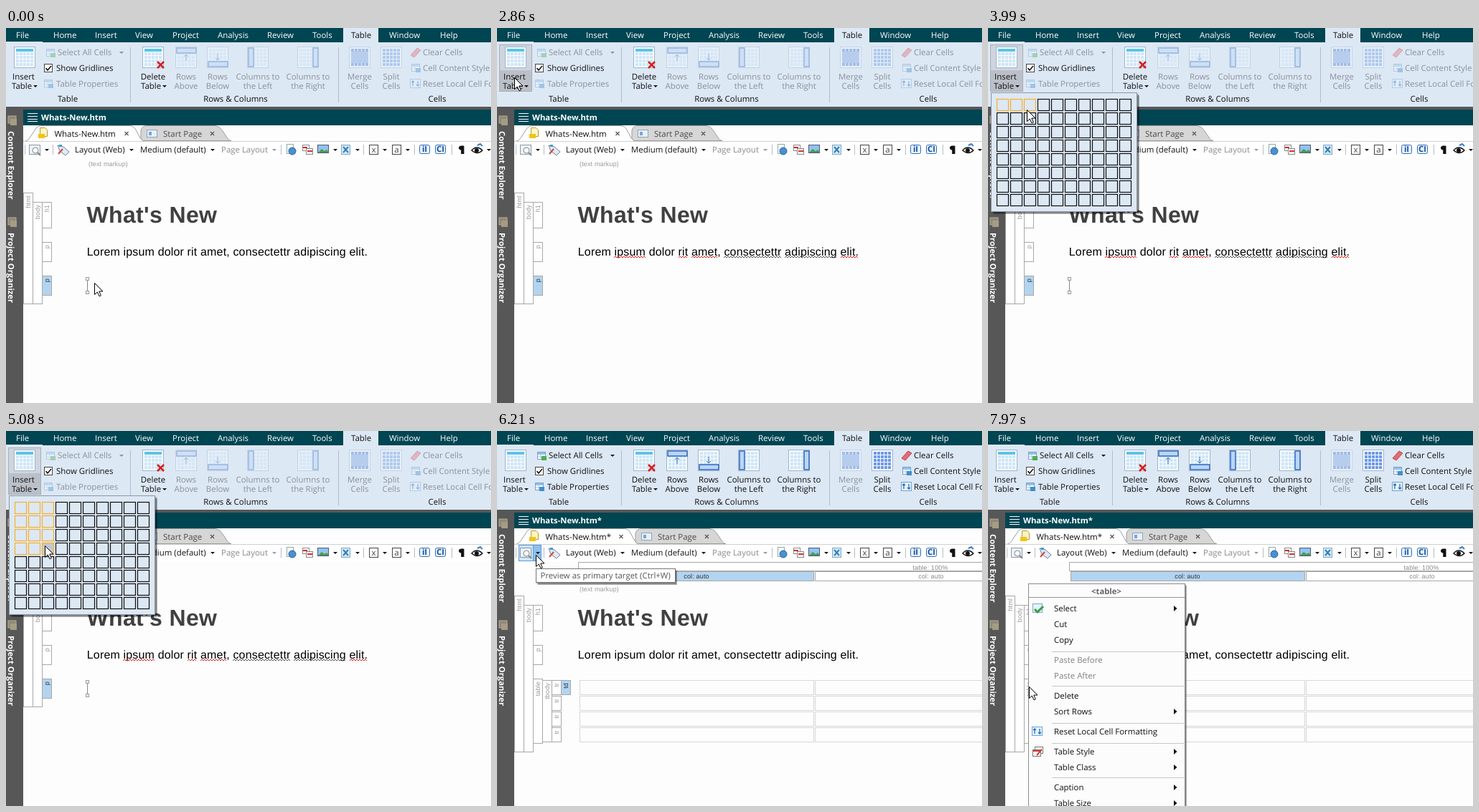
Animation of 676x524 px, one loop 8000 ms. Source, as an HTML page:

```html
<!DOCTYPE html>
<html lang="en">
<head>
<meta charset="utf-8">
<title>Insert a table</title>
<style>
  html, body { margin: 0; width: 100%; height: 100%; overflow: hidden; background: #fdfdfd; }
  svg { display: block; }
  text { font: 11.45px "Open Sans", sans-serif; text-rendering: geometricPrecision; white-space: pre; }
  .b { font-weight: 700; font-size: 11.3px; }
  .s { font: 9px "Liberation Sans", sans-serif; letter-spacing: .15px; }
  .h { font: 700 32px "Liberation Sans", sans-serif; letter-spacing: .35px; }
  .p { font: 16px "Liberation Sans", sans-serif; letter-spacing: .16px; }
  .m { text-anchor: middle; }
  .e { text-anchor: end; }
  .off { opacity: .4; }
</style>
</head>
<body>
<svg id="stage" width="676" height="524" viewBox="0 0 676 524"></svg>
<script>
const TEAL = '#004552', PANEL = '#dde8f5', DARK = '#575757', BLUE = '#b3d4f0', EDGE = '#a8a8a8', INK = '#111';

const text = (x, y, s, fill = INK, cls = '', extra = '') =>
  `<text x="${x}" y="${y}" fill="${fill}" class="${cls}" ${extra}>${s.replace(/&/g, '&amp;').replace(/</g, '&lt;')}</text>`;
const rect = (x, y, w, h, fill = 'none', stroke = 'none', extra = '') =>
  `<rect x="${x}" y="${y}" width="${w}" height="${h}" fill="${fill}" stroke="${stroke}" ${extra}/>`;
const path = (d, fill = 'none', stroke = 'none', width = 1, extra = '') =>
  `<path d="${d}" fill="${fill}" stroke="${stroke}" stroke-width="${width}" ${extra}/>`;
const group = (id, body, extra = '') => `<g id="${id}" ${extra}>${body}</g>`;
const dim = body => `<g class="off">${body}</g>`;
const down = (x, y, fill = INK) => path(`M${x - 3} ${y - 1}h6l-3 3z`, fill);
const vline = (x, y, h, color = '#b4bcc8') => path(`M${x + .5} ${y}v${h}`, 'none', color);
const cross = (x, y, r, color, width) => path(`M${x - r} ${y - r}l${2 * r} ${2 * r}m0 ${-2 * r}l${-2 * r} ${2 * r}`, 'none', color, width);
const repeat = (n, f) => Array.from({ length: n }, (_, i) => f(i)).join('');

// Ribbon
function tableIcon(cx, cell = '#cfe6f8', extra = '') {
  return rect(cx - 14.5, 26.5, 29, 29, '#f8fcff', '#9db4cc') +
    repeat(25, i => rect(cx - 12 + i % 5 * 5, 29 + (i / 5 | 0) * 5, 4, 4, cell)) + extra;
}
const headRow = cx => rect(cx - 12, 29, 24, 4, '#5cc4e6');
const band = (x, y, w, h) => rect(x, y, w, h, '#b9d6f6', '#3a6fc0', 'stroke-width="1.6"');
const bigButton = (cx, icon, a, b) => icon + text(cx, 72, a, INK, 'm') + text(cx, 85, b, INK, 'm');
const smallTable = (x, y, mark = '#3f8fd0') =>
  rect(x + .5, y + .5, 11, 10, '#fff', '#7f9fc4') + rect(x + 1, y + 1, 10, 3, '#8cc4ea') +
  path(`M${x + 1} ${y + 7}h10m-6-3v6`, 'none', '#a9c3de') + rect(x + 6, y + 6, 7, 6, mark);
const refresh = (x, y) => rect(x + .5, y + .5, 14, 12, '#e8f3fc', '#6fa3d6') +
  path(`M${x + 4} ${y + 10}v-7l-2 2m2-2l2 2m5-2v7l-2-2m2 2l2-2`, 'none', '#1f6fc0', 1.3);

const tabs = [['File', 14], ['Home', 66], ['Insert', 124], ['View', 180], ['Project', 232], ['Analysis', 295],
  ['Review', 364], ['Tools', 427], ['Window', 534], ['Help', 605]];

const ribbon =
  rect(0, 0, 676, 20, TEAL) + rect(0, 19, 676, 91, PANEL) + rect(51, 19, 419, 1, TEAL) + rect(519, 19, 157, 1, TEAL) +
  rect(470, 0, 49, 20, PANEL) + tabs.map(([s, x]) => text(x, 14, s, '#fff')).join('') + text(481, 14, 'Table') +
  group('press', rect(4, 24, 44, 35, '#cfd5de') + rect(4, 59, 44, 29, '#bbc0c8') + rect(3.5, 23.5, 45, 65, 'none', '#a7adb6')) +
  tableIcon(26, undefined, headRow(26)) + text(24.5, 72, 'Insert', INK, 'm') + text(8, 85, 'Table') + down(41, 81) +
  rect(53.5, 50.5, 11, 11, '#fff', '#444') + path('M55.500 56l2.500 3l5-6', 'none', INK, 1.5) + text(70, 60, 'Show Gridlines') +
  text(86, 103, 'Table', INK, 'm') + vline(173, 27, 77) +
  tableIcon(205, undefined, headRow(205) + cross(215.5, 51.5, 4.5, '#d3201f', 2.6)) +
  text(205, 72, 'Delete', INK, 'm') + text(188, 85, 'Table') + down(221, 81) +
  text(320, 103, 'Rows & Columns', INK, 'm') + vline(463, 27, 77) + text(601, 103, 'Cells', INK, 'm') +
  dim(bigButton(493, tableIcon(493, '#4f7fd0', rect(481, 33, 24, 16, '#7fa6e4')), 'Merge', 'Cells')) +
  group('editing',
    smallTable(56, 29, '#4caf50') + text(72, 38, 'Select All Cells') + down(161, 34) +
    smallTable(53, 72) + text(70, 82, 'Table Properties') +
    bigButton(251, tableIcon(251, undefined, band(238, 28, 27, 7) + path('M251 46v-9m-3 3l3-3l3 3', 'none', '#3a6fc0')), 'Rows', 'Above') +
    bigButton(295, tableIcon(295, undefined, band(282, 47, 27, 7) + path('M295 36v9m-3-3l3 3l3-3', 'none', '#3a6fc0')), 'Rows', 'Below') +
    bigButton(351, tableIcon(351, undefined, band(338, 28, 7, 26)), 'Columns to', 'the Left') +
    bigButton(421, tableIcon(421, undefined, band(428, 28, 7, 26)), 'Columns to', 'the Right') +
    bigButton(537, tableIcon(537, '#6f9be4'), 'Split', 'Cells') +
    path('M564 38l9-10l5 3l-9 10z', '#e56a72', '#b8454f') + text(581, 38, 'Clear Cells') +
    smallTable(565, 50) + text(581, 60, 'Cell Content Style') +
    refresh(563, 71) + text(581, 82, 'Reset Local Cell Formatting'));

// Frame around the document
const sideTab = (y, s) => text(0, 0, s, '#fff', 'b', `transform="translate(2.500 ${y + 15}) rotate(90)"`) +
  rect(3, y - 6, 11, 10, '#8f8877', '#b5ad98') + rect(6, y - 2, 9, 9, '#a59c84');
const frame =
  rect(0, 110, 676, 4, DARK) + rect(0, 110, 24, 414, DARK) + sideTab(129, 'Content Explorer') + sideTab(271, 'Project Organizer') +
  rect(24, 114, 652, 22, TEAL) + path('M30 119.500h14m-14 4h14m-14 4h14m-14 3h14', 'none', '#fff');

function titles(dx, star) {
  const end = 172 + dx;
  return text(49, 129, 'Whats-New.htm' + star, '#fff', 'b') +
    path(`M${end + 16} 157.500V143q2-6.500 8-6.500H${end + 119}q6 0 10 6l8 12q2 3 5 3z`, '#d6d6d6', '#9c9c9c') +
    path(`M24 158.500q6 0 9-5l8-12q3-5 9-5H${end}q6 0 9 6l6 11q3 5 7 5`, '#fff', '#9c9c9c') +
    path('M47.500 139.500h7l3 3v9h-10z', '#fff5c2', '#b59a34') + rect(45, 148, 9, 6, '#f0c419') +
    text(67.5, 152, 'Whats-New.htm' + star) + cross(end - 4, 147.5, 2.5, '#555', 1.2) +
    rect(end + 24.5, 142.5, 14, 10, '#e8f0f8', '#8ea4bc') + rect(end + 27, 145, 4, 5, '#7ba4d4') +
    text(end + 47, 152, 'Start Page', '#4a4a4a') + cross(end + 115.5, 147.5, 2.5, '#555', 1.2);
}

const boxed = (x, s, color) => rect(x + .5, 163.5, 12, 13, '#fff', color) + text(x + 6.5, 174, s, color, 'm');
const toolbar =
  rect(24, 159, 652, 23, '#fff') + path('M24 158.500h652', 'none', '#d0d0d0') +
  group('hover', rect(30.5, 159.5, 20, 22, '#cfe4f7', '#5b9bd5') + rect(50.5, 159.5, 11, 22, '#8fc0ee', '#5b9bd5')) +
  [26, 65, 383, 498, 569, 621].map(x => vline(x, 163, 14)).join('') +
  rect(32.5, 163.5, 15, 13, '#eef2f6', '#8d99a6') +
  `<circle cx="41" cy="171" r="4" fill="#fff" stroke="#7d8894"/>` + path('M44 174l4 4', 'none', '#7d8894', 2) + down(57, 170) +
  path('M72 164l8 2l8 7l-5 5l-8-6z', '#dfeaf5', '#6b7f96') + path('M73 176l6-7', 'none', '#d0473f', 2) + rect(74, 163, 4, 3, '#3f9bd0') +
  text(96, 174, 'Layout (Web)') + down(175, 170) + text(187, 174, 'Medium (default)') + down(288, 170) +
  text(300, 174, 'Page Layout', '#8a8a8a') + down(374, 170, '#999') +
  rect(391.5, 162.5, 9, 13, '#fff', '#8aa') + '<circle cx="399" cy="172" r="5" fill="#4b8fd0" stroke="#2b5f9a"/>' +
  rect(413.5, 163.5, 9, 8, '#fff', '#888') + rect(418.5, 168.5, 9, 8, '#fff', '#888') + path('M414 167h6m0 5h7', 'none', '#d4302c', 2) +
  rect(434.5, 163.5, 15, 11, '#8fc4f0', '#557') + path('M435 174l5-5l4 3l3-2l3 4z', '#4a9a4e') + down(459, 170) +
  rect(467.5, 163.500, 12, 13, '#d9ebf8', '#7fa6c8') + path('M470 166l7 8m0-8l-7 8', 'none', '#2d7fb8', 2) + down(490, 170) +
  boxed(506, 'x', '#444') + down(528, 170) + boxed(538, 'a', '#444') + down(560, 170) +
  [[576, 'iI'], [598, 'CI']].map(([x, s]) =>
    rect(x + .5, 163.5, 14, 12, '#e4f0fb', '#2f6fc0', 'rx="2"') + text(x + 7.5, 173, s, '#1c4f9c', 'b m')).join('') +
  path('M638 176v-11h-4a2.500 2.500 0 0 0 0 5h1v6m0-11v11', INK, INK) +
  path('M649 171q7-8 15 0q-7 7-15 0z', '#fff', INK, 1.4) + '<circle cx="656" cy="171" r="3" fill="#111"/>' +
  path('M657 164l4-2l3 3', 'none', '#3a7fd0', 2) + down(673, 170);

// Document
const tag = (x, y, h, s, on) => rect(x + .5, y + .5, 13, h - 1, on ? BLUE : '#fff', EDGE) +
  text(0, 0, s, on ? '#234' : '#999', 's e', `transform="translate(${x + 9.5} ${y + 4}) rotate(-90)"`);
const outline = bottom => tag(24, 230, bottom - 230, 'html') + tag(37, 243, bottom - 243, 'body') +
  tag(50, 243, 37, 'h1') + tag(50, 299, 28, 'p');
const squiggle = (x, end, color) => path(`M${x} 321` + repeat((end - x) / 4 | 0, () => 'l2-2l2 2'), 'none', color);

const page = text(112.5, 272, "What's New", '#404040', 'h') +
  text(112.800, 318, 'Lorem ipsum dolor rit amet, consectettr adipiscing elit.', '#000', 'p');
const before = titles(0, '') + text(115, 193, '(text markup)', '#999', 's') + outline(386) + tag(50, 346, 28, 'p', true);
const after = titles(5, '*') +
  rect(113.5, 183.5, 600, 12, '#fff', EDGE) + text(604, 194, 'table: 100%', '#888', 's m') +
  rect(115.5, 196.5, 326, 13, BLUE, EDGE) + text(278, 206, 'col: auto', '#333', 's m') +
  rect(443.5, 196.5, 326, 13, '#fff', EDGE) + text(605, 206, 'col: auto', '#888', 's m') +
  text(115, 224, '(text markup)', '#999', 's') + outline(449) + tag(50, 346, 91, 'table') +
  group('tableTag', tag(50, 346, 91, 'table', true)) + tag(63, 348, 87, 'tbody') +
  repeat(4, i => tag(76, 348 + 22 * i, 21, 'tr')) + tag(89, 348, 21, 'td', true) +
  repeat(8, i => rect(115.5 + i % 2 * 328, 348.5 + 22 * (i >> 1), 326, 20, 'none', '#b0b0b0', 'stroke-dasharray="1 1"'));
const spelling = squiggle(163, 208, '#e02020') + squiggle(253, 268, '#e02020') + squiggle(271, 310, '#e02020') +
  squiggle(316, 397, '#555') + squiggle(401, 475, '#555') + squiggle(479, 503, '#e02020');
const caret = path('M113.500 352v16', 'none', '#888') + rect(111.5, 348.5, 4, 4, '#fff', '#999') + rect(111.5, 367.5, 4, 4, '#fff', '#999');

// Overlays
const shadow = (x, y, w, h) => rect(x + 3, y + 3, w, h, '#000', 'none', 'opacity=".3"') + rect(x + 1, y + 1, w + 1, h + 1, '#000', 'none', 'opacity=".25"');
const picker = shadow(5, 91, 203, 166) + rect(4.5, 90.5, 203, 166, PANEL, '#8d96a3') +
  repeat(80, i => rect(12.5 + i % 10 * 19, 99.5 + (i / 10 | 0) * 19, 16, 16, PANEL, '#111', 'class="cell" stroke-width="1.2"'));
const tooltip = shadow(54, 192, 194, 20) + rect(54.5, 192.5, 194, 19, '#fff', '#777') +
  text(60.5, 206, 'Preview as primary target (Ctrl+W)', '#555');

const entries = [['Select', 252, 1], ['Cut', 274], ['Copy', 296], ['Paste Before', 324], ['Paste After', 346], ['Delete', 374],
  ['Sort Rows', 396, 1], ['Reset Local Cell Formatting', 424], ['Table Style', 452, 1], ['Table Class', 474, 1],
  ['Caption', 502, 1], ['Table Size', 524, 1]];
const menu = shadow(56, 213, 218, 330) + rect(56.5, 213.5, 218, 330, '#fcfcfc', '#8c8c8c') +
  text(165, 228, '<table>', '#666', 'b m') + path('M57 232.500h217', 'none', '#999') +
  [308, 356, 408, 436, 484].map(y => path(`M89 ${y}.5H273`, 'none', '#c8c8c8')).join('') +
  entries.map(([s, y, sub]) => text(92, y, s, s.startsWith('Paste') ? '#808080' : INK) +
    (sub ? path(`M259 ${y - 8}l4.500 4l-4.500 4z`, INK) : '')).join('') +
  rect(62.5, 241.5, 13, 12, '#e4f2fc', '#7fa6c8') + path('M65 249l4 4l8-8', 'none', '#36a03c', 3) + refresh(61, 413) +
  rect(65.5, 441.5, 11, 9, '#fff', '#777') + rect(62.5, 445.5, 11, 9, '#fff', '#777') + path('M63 447h10m-5 6l7-8', 'none', '#d0403a', 2);

const arrow = path('M.5.5V16.500L4.300 13L7 18.800L9.300 17.800L6.800 12H12z', '#fff', '#000');
const beam = path('M-3 -7.500h2.500q.5 0 .5 1v13q0 1-.5 1h-2.500M3 -7.500h-2.500q-.5 0-.5 1m0 13q0 1 .5 1h2.500', 'none', '#000', 1.2);

const stage = document.getElementById('stage');
stage.innerHTML = rect(0, 0, 676, 524, '#fdfdfd') + ribbon + frame + page + group('before', before) + group('after', after) +
  toolbar + group('spelling', spelling) + group('caret', caret) + group('picker', picker) + group('tooltip', tooltip) +
  group('menu', menu) + group('cursor', group('arrow', arrow) + group('beam', beam));

const el = {};
stage.querySelectorAll('[id]').forEach(node => el[node.id] = node);
const cells = [...stage.querySelectorAll('.cell')];
const show = (id, on) => el[id].style.display = on ? '' : 'none';
const within = (t, a, b) => t >= a && t < b;

// Pointer moves: start, end, steps, x, y
const moves = [[270, 670, 4, 117, 370], [940, 1300, 4, 132, 361], [1610, 1860, 3, 130, 324], [2000, 2580, 5, 24, 69],
  [3630, 3990, 4, 54, 114], [4140, 4550, 4, 54, 151], [4690, 4810, 2, 54, 160], [5230, 5840, 5, 54, 173],
  [6360, 7170, 7, 56, 357], [7970, 7970, 1, 56.5, 357]];
function pointer(t) {
  let x = 123, y = 356;
  for (const [start, end, steps, toX, toY] of moves) {
    if (t < start) break;
    const step = t >= end ? steps : 1 + Math.floor((t - start) / (end - start) * (steps - 1));
    x += (toX - x) * step / steps;
    y += (toY - y) * step / steps;
  }
  return [x, y];
}

function draw(t) {
  const [x, y] = pointer(t), inserted = t >= 5230;
  const overButton = x > 3 && x < 49 && y > 23 && y < 89;
  show('before', !inserted);
  show('after', inserted);
  el.editing.setAttribute('class', inserted ? '' : 'off');
  show('spelling', within(t, 1180, 5230));
  show('caret', t < 1060 || within(t, 3230, 5230));
  show('press', !inserted && (overButton || t >= 2710));
  el.press.style.opacity = t < 2710 ? .5 : 1;
  show('picker', within(t, 2980, 5230));
  show('hover', within(t, 5840, 6360));
  show('tooltip', within(t, 6210, 6360));
  show('tableTag', within(t, 6360, 7320) && x > 50 && y > 346);
  show('menu', t >= 7320);
  el.menu.style.opacity = t < 7440 ? .6 : 1;

  const col = Math.floor((x - 11) / 19), row = Math.floor((y - 98) / 19);
  cells.forEach((cell, i) => {
    const c = i % 10, r = i / 10 | 0;
    cell.setAttribute('stroke', c <= col && r <= row ? '#f7b02c' : '#111');
    cell.setAttribute('fill', t >= 5080 && c === col && r === row ? '#c3c8d0' : PANEL);
  });

  const typing = within(t, 270, 2200) && y > 182 && x > 100;
  show('beam', typing);
  show('arrow', !typing);
  el.cursor.setAttribute('transform', `translate(${Math.round(x)} ${Math.round(y)})`);
}

function tick() {
  draw(performance.now() % 8000);
  requestAnimationFrame(tick);
}
tick();
</script>
</body>
</html>
```
